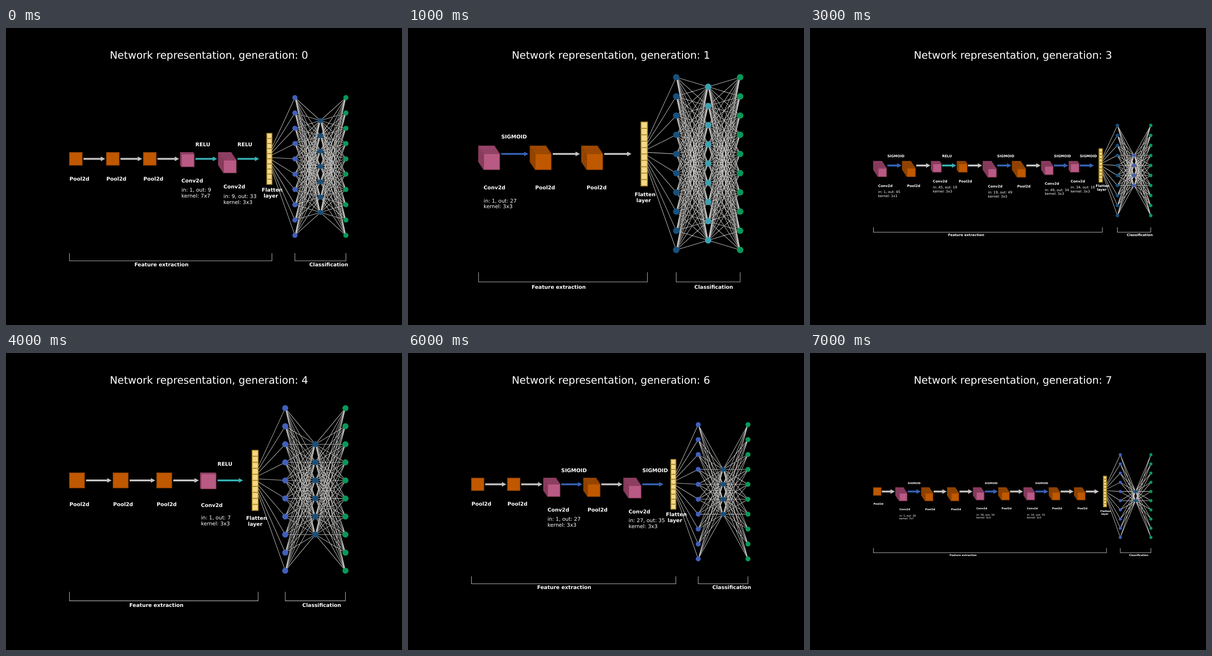
An HTML page that plays this animation: 864 px wide and 648 px high, repeating every 8 s.

```html
<!DOCTYPE html>
<html lang="en">
<head>
<meta charset="utf-8">
<title>Network representation</title>
<style>
  html, body { margin: 0; width: 100%; height: 100%; overflow: hidden; background: #000; }
  svg { display: block; width: 864px; height: 648px; }
  text { font-family: "DejaVu Sans", sans-serif; fill: #fff; white-space: pre; text-rendering: geometricPrecision; }
  .bold { font-weight: bold; }
  .link { stroke: #c4c3c1; stroke-width: 1.05; fill: none; }
</style>
</head>
<body>
<svg id="stage" viewBox="0 0 864 648"></svg>
<script>
const STEP = 1000;
const GREY = '#c4c3c1', GREEN = '#079859';
const NODE = { blue: '#4060bd', navy: '#17507d', teal: '#3fa0af' };
const ARROW = { RELU: '#37b0b4', SIGMOID: '#3762b4' };
const BLOCK = {
  conv: { name: 'Conv2d', fill: '#b95a84', edge: '#853a5b' },
  pool: { name: 'Pool2d', fill: '#c05800', edge: '#8e4200' }
};

// Layers: "p" is pooling, "out/kernel/activation" is a convolution.
const NETS = [
  { layers: 'p p p 9/7/R 33/3/R', input: 'blue', hidden: 'navy', size: 7 },
  { layers: '27/3/S p p', input: 'navy', hidden: 'teal', size: 9 },
  { layers: '47/1/S', input: 'navy', hidden: 'navy', size: 10 },
  { layers: '45/1/S p 19/3/R p 49/3/S p 34/3/S 18/3/S', input: 'navy', hidden: 'blue', size: 4 },
  { layers: 'p p p 7/3/R', input: 'blue', hidden: 'navy', size: 6 },
  { layers: '38/3/R p 11/3/S', input: 'blue', hidden: 'navy', size: 5 },
  { layers: 'p p 27/3/S p 35/3/S', input: 'blue', hidden: 'navy', size: 4 },
  { layers: 'p 39/7/S p p 34/3/S p 33/3/S p p', input: 'blue', hidden: 'navy', size: 2 }
];

const range = n => Array.from({ length: n }, (_, i) => i);

// Lays the blocks out in abstract units, left to right.
function layout(spec) {
  let x = 0, channels = 1;
  const blocks = spec.split(' ').map(item => {
    const b = { x, kind: 'pool' };
    if (item !== 'p') {
      const [out, kernel, act] = item.split('/');
      b.kind = 'conv';
      b.act = act === 'R' ? 'RELU' : 'SIGMOID';
      b.info = [`in: ${channels}, out: ${out}`, `kernel: ${kernel}x${kernel}`];
      channels = +out;
    }
    b.depth = Math.max(1, Math.floor(channels / 3)) - 1;
    b.front = x + b.depth * 0.2;
    b.arrow = b.front + 5.5;
    x = b.arrow + 9;
    return b;
  });
  const flat = x + 2.5;
  return { blocks, flat, dense: flat + 11, width: flat + 32 };
}

function draw(net, generation) {
  const { blocks, flat, dense, width } = layout(net.layers);
  const u = Math.min(498.96 / 71.5, 608.73 / width);
  const X = x => 442.8 + (x - width / 2) * u;
  const Y = y => 327.2 + (y - 7.5) * u;
  const n = blocks.length;
  const font = 0.94 * (n > 8 ? 6 : n > 6 ? 8 : 12);
  const out = [];

  const label = (x, y, str, cls = 'bold') => out.push(
    `<text class="${cls}" x="${X(x)}" y="${Y(y) + 0.7}" font-size="${font}">${str}</text>`);
  // The last line sits on y.
  const lines = (x, y, rows, cls) => rows.forEach((row, i) =>
    label(x, y - (rows.length - 1 - i) * font * 1.13 / u, row, cls));
  const rect = (x, y, w, h, fill, edge, line) => out.push(
    `<rect x="${X(x)}" y="${Y(y)}" width="${w * u}" height="${h * u}" fill="${fill}" stroke="${edge}" stroke-width="${line}"/>`);
  const arrow = (x, color) => {
    const a = X(x), tip = X(x + 8.5), neck = tip - 9.5, y = Y(0);
    out.push(`<path fill="${color}" d="M${a} ${y - 2}H${neck}V${y - 5}L${tip} ${y}L${neck} ${y + 5}V${y + 2}H${a}Z"/>`);
  };
  const bracket = (a, b, str) => {
    out.push(`<path class="link" d="M${X(a)} ${Y(37)}V${Y(40)}H${X(b)}V${Y(37)}"/>`);
    label(a + (b - a) / 3 - 1, 42, str);
  };

  // Links go first so that nodes and labels cover them.
  const columns = [[10, NODE[net.input]], [net.size, NODE[net.hidden]], [10, GREEN]].map(([count, color], c) => ({
    x: dense + c * 10, color, ys: range(count).map(i => 3 + (i - (count - 1) / 2) * 6)
  }));
  let d = '';
  const link = (x1, y1, x2, y2) => d += `M${X(x1)} ${Y(y1)}L${X(x2)} ${Y(y2)}`;
  columns[0].ys.forEach((y, i) => link(flat + 2, i - 4.5, dense, y));
  columns.slice(1).forEach((col, c) =>
    columns[c].ys.forEach(a => col.ys.forEach(b => link(columns[c].x, a, col.x, b))));
  out.push(`<path class="link" d="${d}"/>`);
  for (const col of columns)
    for (const y of col.ys)
      out.push(`<circle cx="${X(col.x)}" cy="${Y(y)}" r="${u}" fill="${col.color}"/>`);

  for (const b of blocks) {
    const { name, fill, edge } = BLOCK[b.kind];
    for (const i of range(b.depth + 1)) rect(b.x + i * 0.2, i * 0.3 - 2.5, 5, 5, fill, edge, 1.5);
    arrow(b.arrow, ARROW[b.act] || GREY);
    const bottom = 2.5 + b.depth * 0.3;
    label(b.front, bottom + 6, name);
    if (b.info) {
      lines(b.front, bottom + 12, b.info, '');
      label(b.arrow, -5, b.act);
    }
  }

  for (const i of range(10)) rect(flat, i * 2 - 10, 2, 2, '#f5d884', '#a98827', 1.9);
  lines(flat - 2, 15, ['Flatten', ' layer']);
  bracket(0, flat + 2, 'Feature extraction');
  bracket(dense, dense + 20, 'Classification');

  out.push(`<text x="442.8" y="67" font-size="22.56" text-anchor="middle">Network representation, generation: ${generation}</text>`);
  return out.join('');
}

const stage = document.getElementById('stage');
const start = performance.now();
let shown = -1;

function tick() {
  const k = Math.floor((performance.now() - start) / STEP) % NETS.length;
  if (k !== shown) stage.innerHTML = draw(NETS[k], shown = k);
  requestAnimationFrame(tick);
}
tick();
</script>
</body>
</html>
```
